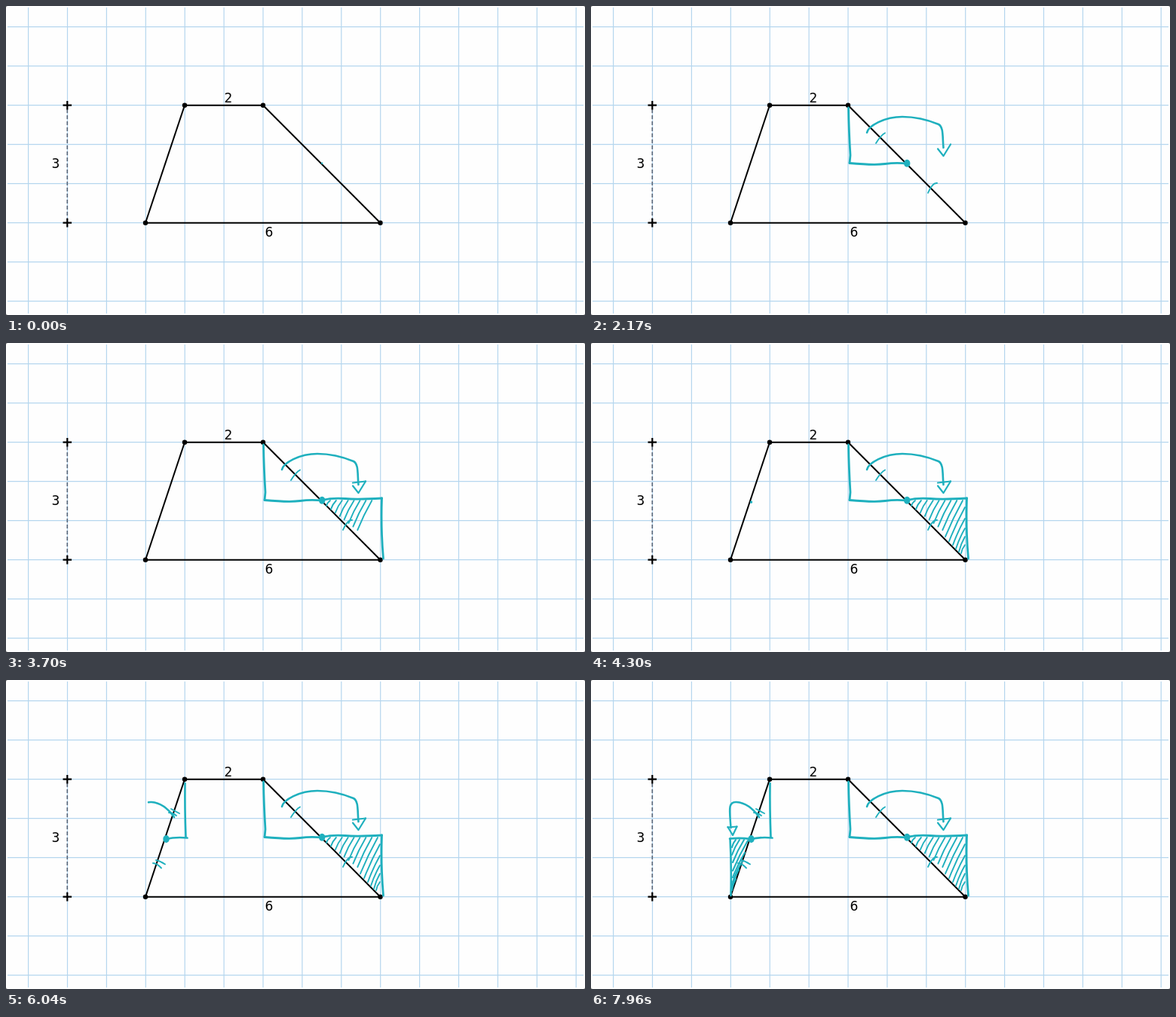
Recreate the animation shown at these times as an HTML page. Size 768 by 410 pixels, loop 8 s.

```html
<!DOCTYPE html>
<html lang="en">
<head>
<meta charset="utf-8">
<title>Trapezoid area</title>
<style>
  html, body { margin: 0; width: 100%; height: 100%; overflow: hidden; background: #777; }
  svg { display: block; width: 768px; height: 410px; }
  text { font: 17px "DejaVu Sans", sans-serif; text-anchor: middle; }
  #grid { stroke: #b5d6ee; stroke-width: 1.2; }
  #ink { fill: none; stroke: #1fb0be; stroke-linecap: round; stroke-linejoin: round; }
  #dots { fill: #1fb0be; }
</style>
</head>
<body>
<svg viewBox="0 0 768 410">
  <rect width="768" height="410" rx="2.5" fill="#fefefe"/>
  <path id="grid"/>
  <g fill="none" stroke="#000" stroke-width="2">
    <path d="M81.3 137V283" stroke="#59677a" stroke-width="1.6" stroke-dasharray="5 3"/>
    <path d="M75.5 131.7h11.6m-5.8-5.8v11.6M75.5 287.7h11.6m-5.8-5.8v11.6" stroke-width="2.2"/>
    <path d="M185 287.7L237 131.7H341L496.5 287.7Z"/>
  </g>
  <circle cx="237" cy="131.7" r="3.2"/>
  <circle cx="341" cy="131.7" r="3.2"/>
  <circle cx="185" cy="287.7" r="3.2"/>
  <circle cx="496.5" cy="287.7" r="3.2"/>
  <text x="295" y="128">2</text>
  <text x="66" y="215">3</text>
  <text x="349" y="305.5">6</text>
  <g id="ink"></g>
  <g id="dots"></g>
</svg>
<script>
const LOOP = 8000;
const parts = [];

function add(parent, tag, attributes) {
  const node = document.createElementNS("http://www.w3.org/2000/svg", tag);
  for (const name in attributes) node.setAttribute(name, attributes[name]);
  document.getElementById(parent).append(node);
  return node;
}

// A pen stroke drawn along its path between two times
function stroke(start, end, d, width = 2.8) {
  const node = add("ink", "path", { d, "stroke-width": width, pathLength: 1, "stroke-dasharray": "1 2" });
  parts.push({ start, end, show(p) {
    node.style.visibility = p > 0 ? "visible" : "hidden";
    node.setAttribute("stroke-dashoffset", 1 - p);
  } });
}

// A pen dot filled in from a small point
function dot(start, end, x, y) {
  const node = add("dots", "ellipse", { cx: x, cy: y });
  parts.push({ start, end, show(p) {
    node.setAttribute("rx", p > 0 ? 1 + 3.2 * p : 0);
    node.setAttribute("ry", p > 0 ? 1 + 4 * p : 0);
  } });
}

// Short slanted lines, one after the other: [x1, y1, x2, y2]
function hatch(start, step, lines, width) {
  lines.forEach(([x1, y1, x2, y2], i) => {
    const from = start + i * step;
    const bend = `${(x1 + x2) / 2 - 1.5} ${(y1 + y2) / 2 - 0.5}`;
    stroke(from, from + step * 0.8, `M${x1} ${y1}Q${bend} ${x2} ${y2}`, width);
  });
}

let grid = "";
for (let i = 0; i < 15; i++) grid += `M${29.6 + 51.9 * i} 2V408`;
for (let i = 0; i < 8; i++) grid += `M2 ${27.6 + 52 * i}H766`;
document.getElementById("grid").setAttribute("d", grid);

// Right side: midpoint, equal halves, cut triangle
dot(-20, 280, 419.2, 208.8);
stroke(400, 520, "M390 168.5Q385 171 378 182", 1.9);
stroke(640, 780, "M459 235Q453 234 447 248", 1.9);
stroke(860, 1090, "M419 209Q404 207.500 390 209.500T343 208.500");
stroke(1100, 1480, "M343 208.500L344 198Q342 165 341.500 135");

// Right side: turning arrow and moved triangle
stroke(1660, 2000, "M366 168C368 159 389 147 413 147Q437 147 461 157C468 161 466 174 467.500 188", 2.6);
stroke(2040, 2160, "M460 189.500L467.500 199L477 183.500", 2.2);
stroke(2230, 2330, "M477 183.500L460 185.500", 2.2);
stroke(2450, 2750, "M419 208.500Q434 205 450 206.500T498.500 206");
stroke(2760, 3060, "M498.500 206Q497 246 500.500 286");
const rightHatch = Array.from({ length: 8 }, (_, i) => [430 + 7.9 * i, 209, 425 + 5.9 * i, 216 + 4.6 * i]);
rightHatch.push(
  [493, 209, 470, 257], [496, 218, 475, 263], [496, 233, 480, 268],
  [496, 246, 484, 273], [496, 257, 488, 277], [496, 268, 491, 279]);
hatch(3130, 73, rightHatch, 1.9);

// Left side: midpoint, equal halves, cut triangle
dot(4260, 4450, 212.5, 211);
stroke(4560, 4630, "M195 243Q200 243 206 249.500", 1.9);
stroke(4700, 4770, "M199 239Q204 240 211 244.500", 1.9);
stroke(4920, 5000, "M216 176Q221 176 226 180", 1.9);
stroke(5110, 5190, "M219 171Q224 174 230 177", 1.9);
stroke(5350, 5500, "M212 211Q225 208 240.500 209.500", 2.6);
stroke(5540, 5800, "M238.500 208Q237 170 237.500 137", 2.6);

// Left side: turning arrow and moved triangle
stroke(5880, 6180, "M223 182C216 172 207 163 193 162C181 161 184 174 185.500 196", 2.5);
stroke(6210, 6320, "M181.500 195L188 206L193.500 194.500", 2.2);
stroke(6340, 6410, "M193.500 194.500L181.500 195.500", 2.2);
stroke(6540, 6680, "M212 211Q198 209 184 210.500", 2.6);
stroke(6700, 7020, "M184.500 210.500Q186.500 248 185.500 286", 2.6);
hatch(7110, 95, [
  [192, 212, 187, 222], [197, 212, 187, 232], [203, 212, 188, 242],
  [208, 213, 188, 253], [204, 229, 188, 262], [201, 240, 188, 268],
  [196, 252, 187, 273], [192, 264, 187, 279]], 2.1);

function draw(now) {
  const t = now % LOOP;
  for (const { start, end, show } of parts) {
    show(Math.min(1, Math.max(0, (t - start) / (end - start))));
  }
}

const origin = performance.now();
function frame() {
  draw(performance.now() - origin);
  requestAnimationFrame(frame);
}
frame();
</script>
</body>
</html>
```
